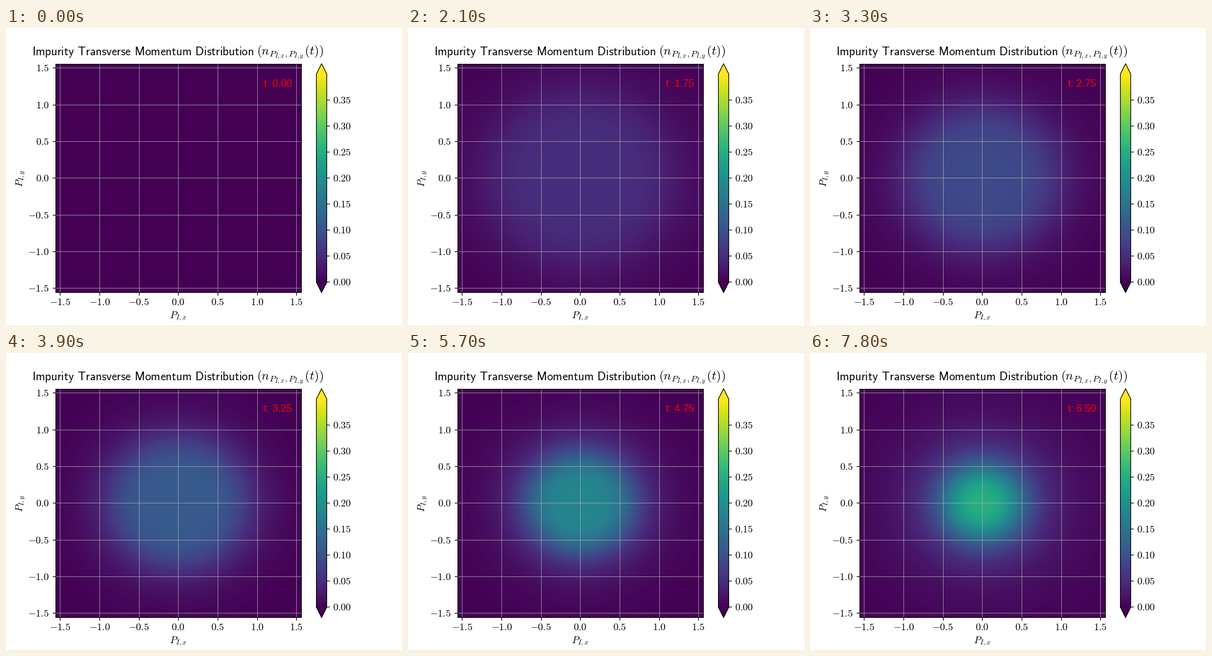
A matplotlib script for the animation above (8000 ms loop, 640x480 px).

```python
import numpy as np
import matplotlib.pyplot as plt
from matplotlib.animation import FuncAnimation

plt.rcParams.update({
    "mathtext.fontset": "cm",
    "font.family": "Liberation Sans",
    "font.size": 11.8,
})

FRAME_MS, LOOP_MS = 100, 8000
STEP_MS, STEP_TIME = 300, 0.25
LIMIT = 1.5577
VMAX = 0.4

# Shape of the distribution over time: peak height, radius, steepness
KEY_TIMES = [0, 0.75, 1.75, 2.75, 3.75, 4.75, 5.75, 6.5]
PEAK = [0, 0.012, 0.052, 0.088, 0.137, 0.182, 0.222, 0.25]
RADIUS = [2.3, 1.75, 1.23, 0.996, 0.848, 0.72, 0.62, 0.54]
STEEPNESS = [5.6, 5.6, 5.6, 5.6, 5.6, 4.6, 3.8, 3.2]


def sans(text):
    """Sans-serif math text with normal word spaces."""
    return r"$\mathsf{%s}$" % text.replace(" ", r"\hspace{0.38}")


def math_labels(values, digits):
    return [f"${v:.{digits}f}$" for v in values]


def density(t):
    peak, radius, steepness = (
        np.interp(t, KEY_TIMES, curve) for curve in (PEAK, RADIUS, STEEPNESS))
    return peak / (1 + (distance / radius) ** steepness)


xs = np.linspace(-LIMIT, LIMIT, 397)
ys = np.linspace(-LIMIT, LIMIT, 370)
distance = np.hypot(xs[None, :], ys[:, None])

fig, ax = plt.subplots(figsize=(6.4, 4.8), dpi=100)
image = ax.imshow(density(0), origin="lower", aspect="auto", cmap="viridis",
                  vmin=0, vmax=VMAX, interpolation="nearest",
                  extent=(-LIMIT, LIMIT, -LIMIT, LIMIT))

bar = fig.colorbar(image, ax=ax, extend="both", aspect=22)
bar_ticks = np.arange(8) * 0.05
bar.set_ticks(bar_ticks, labels=math_labels(bar_ticks, 2))

ticks = np.arange(-3, 4) * 0.5
ax.set_xticks(ticks, math_labels(ticks, 1))
ax.set_yticks(ticks, math_labels(ticks, 1))
ax.tick_params(axis="x", pad=3)
ax.grid(linewidth=0.5)
ax.set_xlabel(r"$P_{I,x}$")
ax.set_ylabel(r"$P_{I,y}$", labelpad=1)

# Title: words and formula share one baseline
title_y = 1 - 44 / 480
fig.text(42 / 640, title_y, sans("Impurity Transverse Momentum Distribution"),
         fontsize=13.8)
fig.text(513 / 640, title_y, r"$(n_{P_{I,x},P_{I,y}}(t))$",
         fontsize=14.8, ha="right")
clock = ax.text(0.85, 0.9, "", color="red", transform=ax.transAxes)


def update(frame):
    t = frame * FRAME_MS // STEP_MS * STEP_TIME
    image.set_data(density(t))
    clock.set_text(f"t: {t:.2f}")
    return image, clock


anim = FuncAnimation(fig, update, frames=LOOP_MS // FRAME_MS,
                     interval=FRAME_MS, repeat=True, repeat_delay=0)
plt.show()
```
